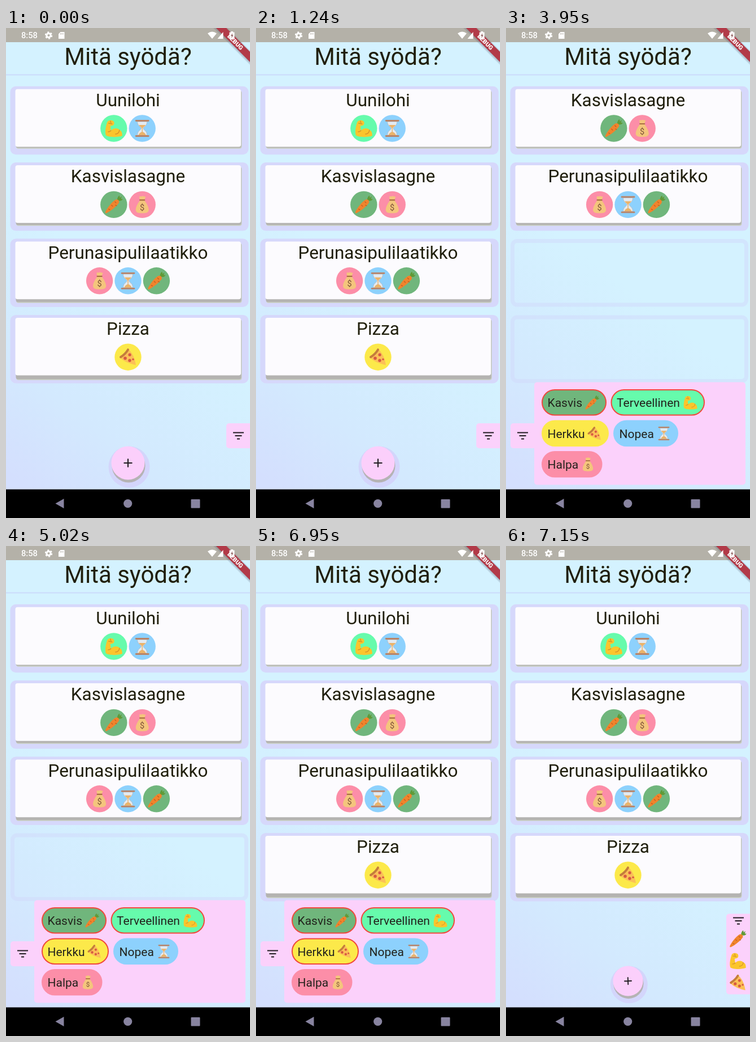
An HTML page that plays this animation: 432x864 px, repeating every 8000 ms.

```html
<!DOCTYPE html>
<html lang="fi">
<head>
<meta charset="utf-8">
<title>Mitä syödä?</title>
<style>
  html, body { margin: 0; width: 100%; height: 100%; overflow: hidden; background: #000; }
  svg { display: block; width: 100%; height: 100%; font-family: Roboto, sans-serif; }
</style>
</head>
<body>
<svg id="stage" viewBox="0 0 432 864" preserveAspectRatio="none">
  <defs>
    <linearGradient id="sky" gradientUnits="userSpaceOnUse" x1="60" y1="830" x2="300" y2="520">
      <stop offset="0" stop-color="#d4dffe"/>
      <stop offset=".4" stop-color="#d3e9fe"/>
      <stop offset="1" stop-color="#d4f2ff"/>
    </linearGradient>
    <filter id="soft"><feGaussianBlur stdDeviation="2.5"/></filter>

    <!-- icons in a box from -16 to 16 -->
    <g id="arm">
      <path d="M-14 12C-16 5-14-3-12-10C-11-14-7-15-3-14C2-13 2-6-2-5L-6-4L-5 4C-2 0 7-2 10 3C14 4 15 8 15 13C7 16-10 16-14 12Z" fill="#fbc52c"/>
      <path d="M-9-9L-3-8M-5 4C-7 6-9 6-10 6M3 10C7 10 10 7 10 3M-6-13L-5-10" fill="none" stroke="#d7932a" stroke-width="1.4" stroke-linecap="round"/>
    </g>
    <g id="glass">
      <path d="M-8.500-12C-9-4-2-3-2 0C-2 3-9 4-8.500 12H8.500C9 4 2 3 2 0C2-3 9-4 8.500-12Z" fill="#e4eaf0" stroke="#a9bccb"/>
      <path d="M-6-6H6C4-3 1-2 .7 0V6C3 7 6 9 6.500 12H-6.500C-6 9-3 7-.7 6V0C-1-2-4-3-6-6Z" fill="#eab36a"/>
      <path d="M-11-13.500H11M-11 13.500H11" stroke="#b98468" stroke-width="2.800" stroke-linecap="round"/>
    </g>
    <g id="carrot">
      <path d="M6-8C6-12 8-15 10-16L11-12L14-15L13-10L16-10C14-6 10-6 6-8Z" fill="#5f9a38"/>
      <path d="M2-8C6-11 11-7 9-3C5 3-5 11-13 15C-15 15.500-15.500 14-14.500 12C-11 5-4-4 2-8Z" fill="#f0842c"/>
      <path d="M2-5L4-3M-4 1L-2 3M3 1L5 2M-9 8L-7 9" stroke="#c35f20" stroke-width="1.300" stroke-linecap="round"/>
    </g>
    <g id="bag">
      <path d="M-3.500-8C-5-12-6-13-4-15C-2-13 0-16 2-15C3-13 5-16 6-13C5-11 4-10 3.500-8C7-4 11.500 4 11.500 9C11.500 14 7 15 0 15C-7 15-11.500 14-11.500 9C-11.500 4-7-4-3.500-8Z" fill="#f4c57c"/>
      <path d="M-4-8H4" stroke="#a86d43" stroke-width="2.200" stroke-linecap="round"/>
      <text y="9.500" font-size="14.500" text-anchor="middle" fill="#7d5138">$</text>
    </g>
    <g id="pizza">
      <path d="M-14 1C-9-3-4-8 0-14C7-9 12 1 14 14C4 12-7 8-14 1Z" fill="#fbc057"/>
      <path d="M-13 0C-8-3-3-8 0-13" fill="none" stroke="#c47d3c" stroke-width="4" stroke-linecap="round"/>
      <g fill="#d85a42"><circle cx="-5" cy="2" r="2.800"/><circle cx="3" cy="-4" r="2.600"/><circle cx="3" cy="6" r="2.700"/><circle cx="9" cy="4" r="1.800"/></g>
    </g>
    <path id="lines" d="M-9.5-5.5H9.5M-6 0H6M-2.5 5.5H2.5" stroke="#221d22" stroke-width="2"/>
  </defs>

  <rect width="432" height="864" fill="url(#sky)"/>
  <rect y="81.5" width="432" height="2" fill="#ccdcfb"/>
  <text x="216" y="65" font-size="42" text-anchor="middle" fill="#201f0c">Mitä syödä?</text>

  <g id="list"></g>

  <g id="fab">
    <circle cx="2" cy="7" r="36.5" fill="#d3d5fb"/>
    <circle cx="1" cy="5" r="29.5" fill="#b5b3b4"/>
    <circle r="29.5" fill="#fbcffb"/>
    <path id="plus" d="M-7.5 0H7.5M0-7.5V7.5" stroke="#221d22" stroke-width="2.1"/>
  </g>

  <g id="drawer">
    <rect id="tab" x="8" width="46" rx="5" fill="#fbd1fb"/>
    <rect x="50" y="624.5" width="374" height="181" rx="5" fill="#fbd1fb"/>
    <use id="filter" href="#lines" x="29.5"/>
    <g id="picked"></g>
    <g id="chips"></g>
  </g>

  <rect width="432" height="25" fill="#b4b1a8"/>
  <g transform="translate(406.5 25.5) rotate(45)">
    <rect x="-52" y="-6" width="104" height="14" fill="#565b70" opacity=".5" filter="url(#soft)"/>
    <rect x="-60" y="-6.4" width="120" height="12.8" fill="#b23a48"/>
    <text x="-1" y="3.5" font-size="10.7" font-weight="900" text-anchor="middle" fill="#fff">DEBUG</text>
  </g>
  <g fill="#fff">
    <text x="27" y="18" font-size="14.7" font-weight="500" textLength="">8:58</text>
    <circle cx="75.5" cy="13" r="3.6" fill="none" stroke="#fff" stroke-width="3"/>
    <circle cx="75.5" cy="13" r="5.7" fill="none" stroke="#fff" stroke-width="2" stroke-dasharray="3 2.97"/>
    <path d="M96.5 7H103.5V19H93V10.5Z"/>
    <path d="M96.5 9V11.5M98.7 9V11.5M101 9V11.5" stroke="#b4b1a8"/>
    <path d="M357 9.5Q365 3.5 373 9.5L365 19Z"/>
    <path d="M384.5 7V19H374.5Z"/>
    <path d="M398 6H402V7.5H404.5V19.5H395.5V7.5H398Z"/>
    <path d="M401 9L398 14H400L399 18L402.5 12.5H400.5Z" fill="#8d5a58"/>
  </g>

  <rect y="813.5" width="432" height="50.5" fill="#000"/>
  <g fill="#8884a0">
    <path d="M87.5 838.5L102.5 830V847Z"/>
    <circle cx="215.7" cy="838.5" r="7.6"/>
    <rect x="327.5" y="831" width="16" height="15.5" rx="1"/>
  </g>
</svg>

<script>
const LOOP = 8000;
const PITCH = 134.4;
const OPEN_AT = 1400, CLOSE_AT = 6950, LAST_MOVE = 7150;
const TINT = { arm: '#66fbac', glass: '#8dd1fd', carrot: '#70b67c', bag: '#fc8ea8', pizza: '#fce94a' };

const MEALS = [
  ['Uunilohi', ['arm', 'glass']],
  ['Kasvislasagne', ['carrot', 'bag']],
  ['Perunasipulilaatikko', ['bag', 'glass', 'carrot']],
  ['Pizza', ['pizza']]
];

// label, icon, x, y, width, time of selection
const CHIPS = [
  ['Kasvis', 'carrot', 63, 637, 115, 2430],
  ['Terveellinen', 'arm', 185.5, 637, 166.5, 3950],
  ['Herkku', 'pizza', 63, 691.5, 119, 5020],
  ['Nopea', 'glass', 190, 691.5, 115, Infinity],
  ['Halpa', 'bag', 63, 746, 107.5, Infinity]
];

// time from which these meals are listed
const LISTS = [
  [0, [0, 1, 2, 3]],
  [3950, [1, 2]],
  [5020, [0, 1, 2]],
  [6950, [0, 1, 2, 3]]
];

const $ = id => document.getElementById(id);
const clamp = v => Math.min(1, Math.max(0, v));
const easeInOut = u => u * u * (3 - 2 * u);
const easeOut = u => 1 - (1 - u) ** 3;

const rect = (x, y, w, h, r, fill, more = '') =>
  `<rect x="${x}" y="${y}" width="${w}" height="${h}" rx="${r}" fill="${fill}" ${more}/>`;
const icon = (name, x, y, size = 1) =>
  `<use href="#${name}" transform="translate(${x} ${y}) scale(${size})"/>`;

function card(meal, slot) {
  const [name, tags] = MEALS[meal];
  const y = 107.7 + slot * PITCH;
  const drop = 2 + slot * 1.6;
  const badges = tags.map((tag, i) => {
    const x = 216 + (i - (tags.length - 1) / 2) * 50.4;
    return `<circle cx="${x}" cy="${y + 69.3}" r="23.7" fill="${TINT[tag]}"/>` + icon(tag, x, y + 69.3);
  }).join('');
  return rect(7.5, y - 5, 422, 120.5, 10, '#d6d8fb') +
    rect(18, y + 3, 399.5, 100 + drop, 4, '#c9d0c0') +
    rect(17.5, y + 2, 399, 99.5 + drop, 4, '#b4b3b1') +
    rect(16.5, y, 399.5, 101.7, 4, '#fcfbfe') +
    `<text x="216" y="${y + 30.3}" font-size="31.5" text-anchor="middle" fill="#201f0c">${name}</text>` + badges;
}

// faint frame left where a card has gone
function trace(slot) {
  const y = 107.7 + slot * PITCH;
  return rect(11.5, y - 1, 414, 112.5, 8, 'none', 'stroke="#d2d9fc" stroke-width="7" opacity=".5"');
}

function chip([label, tag, x, y, w, since], t) {
  const edge = t >= since ? '#f0483c' : TINT[tag];
  return rect(x + 1, y + 1, w - 2, 44.5, 22.25, TINT[tag], `stroke="${edge}" stroke-width="2"`) +
    `<text x="${x + 10.5}" y="${y + 31}" font-size="21" fill="#22221c">${label}</text>` +
    icon(tag, x + w - 25.5, y + 23.5, 0.8);
}

const shown = {};
function fill(id, key, make) {
  if (shown[id] === key) return;
  shown[id] = key;
  $(id).innerHTML = make();
}

function draw(time) {
  const t = Math.min(time, LAST_MOVE);

  const meals = LISTS.filter(([from]) => t >= from).pop()[1];
  fill('list', meals.join(), () =>
    [0, 1, 2, 3].map(i => i < meals.length ? card(meals[i], i) : trace(i)).join(''));
  fill('chips', CHIPS.filter(c => t >= c[5]).length, () => CHIPS.map(c => chip(c, t)).join(''));

  const opened = easeOut(clamp((t - OPEN_AT) / 290));
  const closed = easeInOut(clamp((t - CLOSE_AT - 15) / 175));
  $('drawer').setAttribute('transform', `translate(${382 * (1 - opened + closed)} 0)`);

  const tall = t > CLOSE_AT + 35;
  $('tab').setAttribute('y', tall ? 648.5 : 697);
  $('tab').setAttribute('height', tall ? 142 : 44);
  $('filter').setAttribute('y', tall ? 661 : 719);
  fill('picked', tall, () => tall
    ? ['carrot', 'arm', 'pizza'].map((tag, i) => icon(tag, 28.5, 693 + 38.5 * i, 0.95)).join('')
    : '');

  const u = t < CLOSE_AT ? 1 - clamp((t - OPEN_AT) / 200) : clamp((t - CLOSE_AT - 10) / 200);
  $('fab').setAttribute('transform', `translate(216 767) scale(${u * u})`);
  $('plus').setAttribute('transform', `rotate(${-45 * (1 - u)})`);
}

const start = performance.now();
function tick() {
  draw((performance.now() - start) % LOOP);
  requestAnimationFrame(tick);
}
tick();
</script>
</body>
</html>
```
